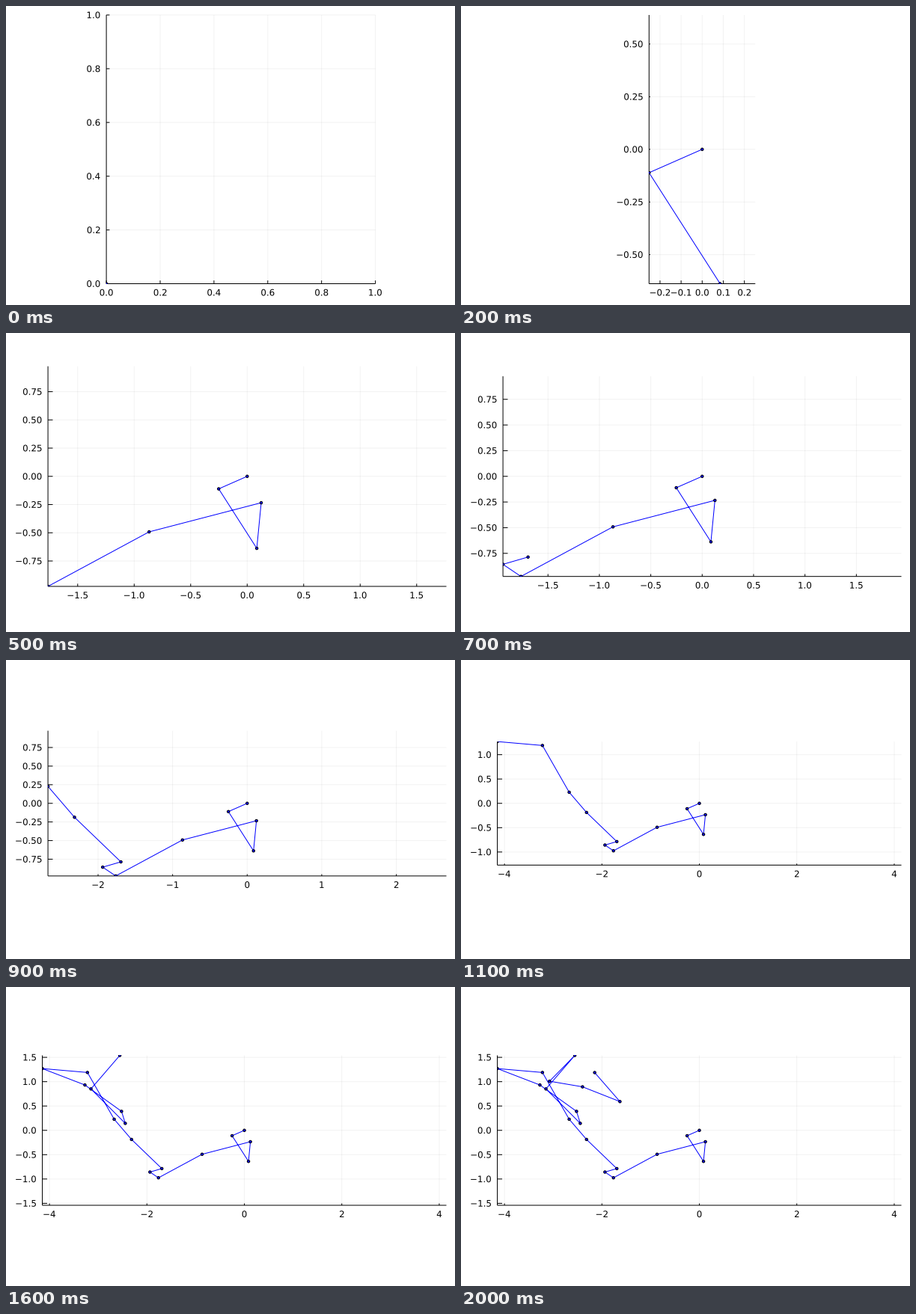
These frames come from a looping animation (600 by 400 pixels, 2100 ms). A matplotlib script:

```python
import numpy as np
import matplotlib.pyplot as plt
from matplotlib.animation import FuncAnimation
from matplotlib.patches import Circle, PathPatch, Rectangle
from matplotlib.textpath import TextPath
from matplotlib.transforms import Affine2D

W, H, DPI = 600, 400, 100
PX = 72 / DPI                      # points per pixel
EM = 11.85                         # font size in pixels
TOP, BOTTOM, RIGHT = 12, 371.5, 588.5

# Corners of the walk from the origin, as x + yj
CORNERS = [
    -.252 - .111j, .085 - .638j, .124 - .234j, -.868 - .492j, -1.763 - .975j,
    -1.938 - .857j, -1.694 - .786j, -2.316 - .187j, -2.672 + .228j,
    -3.221 + 1.189j, -4.147 + 1.269j, -3.273 + .932j, -2.521 + .39j,
    -2.444 + .143j, -3.149 + .851j, -2.556 + 1.54j, -3.075 + 1.009j,
    -2.398 + .894j, -1.63 + .591j, -2.149 + 1.187j]
WALK = np.array([[p.real, p.imag] for p in [0j, *CORNERS]])

plt.rcParams["font.family"] = "DejaVu Sans"
fig = plt.figure(figsize=(W / DPI, H / DPI), dpi=DPI, facecolor="white")
ax = fig.add_axes([0, 0, 1, 1])


def tick_step(half):
    """Largest round step that gives at least five ticks in -half..half."""
    sizes = [m * 10.0 ** e for e in (1, 0, -1, -2) for m in (5, 2.5, 2, 1)]
    return next(s for s in sizes if half / s >= 2)


def ticks(lo, hi, step):
    values = np.arange(np.ceil(lo / step), np.floor(hi / step) + 1) * step
    digits = next(d for d in range(4) if abs(round(step, d) - step) < 1e-9)
    return values, [("\u2212" if v < -1e-9 else "") + f"{abs(v):.{digits}f}"
                    for v in values]


def glyphs(text):
    return TextPath((0, 0), text, size=EM)


def label(x, y, text, align):
    """Text on baseline y; align 0.5 centres it on x, 1 ends it there."""
    path = glyphs(text)
    box = path.get_extents()
    place = Affine2D().scale(1, -1).translate(x - box.x0 - align * box.width, y)
    ax.add_patch(PathPatch(place.transform_path(path), fc="black", lw=0,
                           snap=False))


def line(x, y, alpha=1.0, z=2):
    ax.plot(x, y, color="black", lw=PX, alpha=alpha, zorder=z, snap=False,
            solid_capstyle="butt")


def draw(n):
    ax.clear()
    ax.set(xlim=(0, W), ylim=(H, 0))
    ax.axis("off")
    pts = WALK[:n + 1]

    if n:
        hi = np.abs(pts).max(axis=0)
        lo, steps = -hi, [tick_step(h) for h in hi]
    else:
        lo, hi, steps = np.zeros(2), np.ones(2), (.2, .2)
    xticks, xlabels = ticks(lo[0], hi[0], steps[0])
    yticks, ylabels = ticks(lo[1], hi[1], steps[1])

    # Fit the plot area with equal scales, centred in the free space
    left = 21.8 + max(glyphs(s).get_extents().width for s in ylabels)
    span = hi - lo
    scale = min((RIGHT - left) / span[0], (BOTTOM - TOP) / span[1])
    w, h = span * scale
    x0 = (left + RIGHT - w) / 2
    y0 = (TOP + BOTTOM + h) / 2
    x1, y1 = x0 + w, y0 - h

    def px(x):
        return x0 + (x - lo[0]) * scale

    def py(y):
        return y0 - (y - lo[1]) * scale

    for x, s in zip(px(xticks), xlabels):
        line([x, x], [y0, y1], .05, 1)
        line([x, x], [y0, y0 - .012 * h])
        label(x, y0 + 16, s, .5)
    for y, s in zip(py(yticks), ylabels):
        line([x0, x1], [y, y], .05, 1)
        line([x0, x0 + .012 * w], [y, y])
        label(x0 - 8.6, y + 4.3, s, 1)
    line([x0, x1], [y0, y0])
    line([x0, x0], [y0, y1])

    clip = Rectangle((x0, y1), w, h, transform=ax.transData)
    xs, ys = px(pts[:, 0]), py(pts[:, 1])
    path, = ax.plot(xs, ys, color="blue", lw=PX, zorder=3, snap=False)
    path.set_clip_path(clip)
    for x, y in zip(xs, ys):
        dot = ax.add_patch(Circle((x, y), 1.7, fc="blue", ec="black", lw=PX,
                                  zorder=4, snap=False))
        dot.set_clip_path(clip)
    return []


anim = FuncAnimation(fig, draw, frames=len(WALK), interval=100, repeat=True,
                     repeat_delay=0, init_func=lambda: draw(0), blit=False)
plt.show()
```
